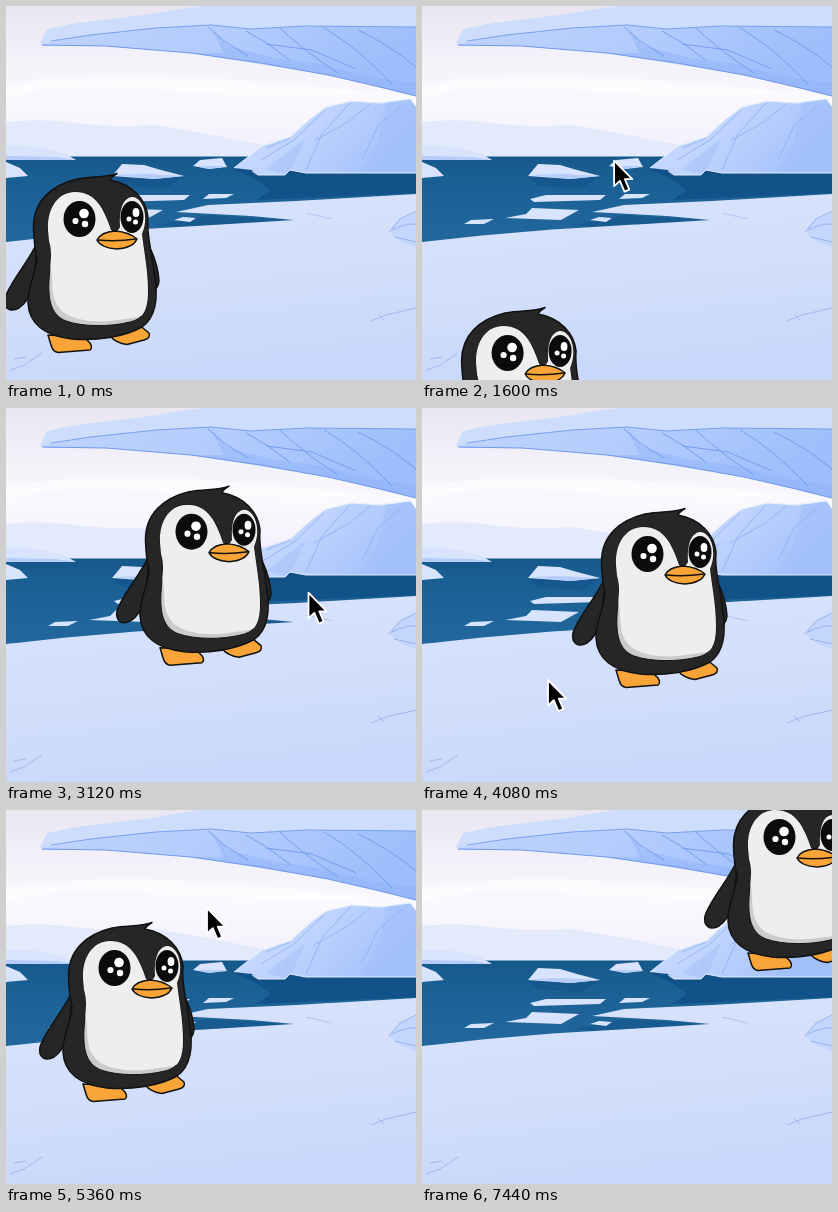
These frames come from a looping animation (410x374 px, 7.52 s). An HTML page:

```html
<!DOCTYPE html>
<html lang="en">
<head>
<meta charset="utf-8">
<title>Penguin on the ice</title>
<style>
html, body { margin: 0; width: 100%; height: 100%; overflow: hidden; background: #d3dffa; }
svg { display: block; width: 100%; height: 100%; }
</style>
</head>
<body>
<svg viewBox="0 0 410 374" preserveAspectRatio="none">
  <defs>
    <linearGradient id="sky" x2="0" y2="1">
      <stop offset="0" stop-color="#e9e6f2"/><stop offset=".35" stop-color="#f3f1f9"/>
      <stop offset=".62" stop-color="#faf9fd"/><stop offset="1" stop-color="#f1effb"/>
    </linearGradient>
    <linearGradient id="sea" x2="0" y2="1">
      <stop offset="0" stop-color="#15588c"/><stop offset=".3" stop-color="#1b6095"/>
      <stop offset="1" stop-color="#22689e"/>
    </linearGradient>
    <linearGradient id="snow" x2=".25" y2="1">
      <stop offset="0" stop-color="#d9e3fb"/><stop offset=".5" stop-color="#d3dffb"/>
      <stop offset="1" stop-color="#c9d9fb"/>
    </linearGradient>
    <linearGradient id="shelf" x2="1" y2=".25">
      <stop offset="0" stop-color="#c0d4fd"/><stop offset=".5" stop-color="#b3ccfd"/>
      <stop offset="1" stop-color="#9dbefb"/>
    </linearGradient>
    <linearGradient id="berg" x2="1" y2=".4">
      <stop offset="0" stop-color="#cfdefe"/><stop offset=".5" stop-color="#bfd4fe"/>
      <stop offset="1" stop-color="#a5c2fb"/>
    </linearGradient>
    <path id="belly" d="M42 224C41 201 53 186 69 186C90 186 98 203 105 224Q110 229 114 221C113 204 117 191 127 191C138 193 143 212 136 228C138 246 142 264 142 285C142 306 136 313 124 316C104 321 77 321 60 315C45 309 42 294 43 274C44 257 47 248 43 235Z"/>
    <clipPath id="inBelly"><use href="#belly"/></clipPath>
  </defs>

  <path fill="url(#sky)" d="M0 0H410V152H0Z"/>
  <path fill="#fff" opacity=".45" d="M0 78Q90 64 200 72T380 88Q250 92 150 84T0 92Z"/>
  <path fill="#e2eafb" d="M0 116Q35 112 70 117T150 119Q200 127 256 139V152H0Z"/>

  <path fill="url(#sea)" d="M0 150.5H410V240H0Z"/>
  <path fill="#0d4c83" opacity=".7" d="M228 163 248 172 265 184 250 194 410 187V166Z"/>
  <path fill="#114f83" opacity=".45" d="M106 171 178 171 160 182 118 180ZM150 219 205 209 285 214 190 223Z"/>

  <g fill="#d8e4fd">
    <path d="M0 139 30 141 58 147 70 154H0Z"/>
    <path d="M0 156 14 162 22 170 0 172Z"/>
    <path d="M106 170 116 158 138 159 155 164 178 170 148 173Z"/>
    <path d="M187 160 194 154 216 152 221 161 203 163Z"/>
    <path d="M108 193 124 189 184 189 178 194 112 196Z"/>
    <path d="M197 193 203 188 228 188 220 192Z"/>
    <path d="M83 212 104 208 110 202 157 204 139 214Z"/>
    <path d="M42 218 49 214 72 213 62 218Z"/>
    <path d="M168 214 177 211 190 212 184 216Z"/>
  </g>
  <path fill="#b5cdf8" d="M0 150 50 151 70 154H0ZM108 169 140 168 178 170 148 173ZM190 160 221 160 203 163Z"/>

  <path fill="url(#berg)" d="M228 162 256 140 284 131 304 113 320 101 346 95 374 97 404 93 410 101V167L300 167 284 164 279 169 252 169 246 164Z"/>
  <path fill="#9dbcf9" opacity=".45" d="M380 97 404 93 410 101V167H352L372 136ZM260 163 300 132 286 162 279 168Z"/>
  <path fill="none" stroke="#8fb2f2" stroke-width=".9" d="M344 97 316 128 300 164M364 98 342 116 308 135M396 99 372 120 356 153M318 105 288 134 255 154M284 132 260 142"/>
  <path fill="none" stroke="#e6eefe" stroke-width="1" d="M228 162 256 140 284 131 304 113 320 101 346 95 374 97 404 93M246 165 252 169H279L284 164 300 167H410"/>

  <path fill="#cfddfc" d="M34 37 41 23 70 17 145 8 180 2 196 0H410V34L40 39Z"/>
  <path fill="url(#shelf)" d="M34 38 85 29 150 22 205 19 245 23 300 20 410 21V90L374 81 322 69 255 57 185 47 100 40 40 40Z"/>
  <path fill="#8fb3fa" opacity=".5" d="M205 22 222 40 268 52 315 58 370 72 410 77V90L322 69 185 47 218 47Z"/>
  <g fill="none" stroke="#6f9aeb" stroke-width="1.1">
    <path d="M36 39 100 40 185 47 255 57 322 69 374 81 410 90"/>
    <path d="M45 35 85 29 150 22 205 19 245 23 300 20 410 21" stroke-width=".9"/>
    <path d="M202 21 218 35 242 50M240 25 262 38 285 55M274 22Q294 42 332 67M318 22Q350 40 386 78M352 24Q382 38 410 61M260 38 306 44 350 63" stroke-width=".9"/>
  </g>

  <path fill="url(#snow)" d="M0 236 60 229.5 130 223.5 215 218.5 288 214 245 210 170 206 202 199 290 195 410 188V374H0Z"/>
  <path fill="#c3d6fc" d="M383 226 394 213 410 205V241L396 236Z"/>
  <g fill="none" stroke="#94b2ea" stroke-width="1">
    <path d="M383 226 394 213 410 205M386 224Q400 217 410 218M388 231 410 236"/>
    <path d="M4 364 18 359 36 347M8 353 20 351M365 315 380 309 410 302M372 308 378 314" stroke-width=".8"/>
    <path d="M300 207 326 213" stroke-width=".6"/>
  </g>

  <g id="penguin" stroke="#111" stroke-width="1.5" stroke-linejoin="round">
    <path fill="#f9a437" d="M42 329 78 331 84 337Q87 342 84 344L52 346.5Q47 346 45 339Z"/>
    <path fill="#f9a437" d="M104 330 132 318 143 327Q145 332 138 334L121 338.5Q110 337 104 330Z"/>
    <path fill="#262626" d="M32 235C22 257 4 276-1 292C-3 302 4 307 13 302Q22 296 27 280Z"/>
    <path fill="#262626" d="M145 244Q152 259 153 275Q152 284 146 284Z"/>
    <path fill="#262626" d="M27.5 222C27 195 46 179 71 173C88 170 98 172 111 167.5Q105 171 104 174C126 178 140 193 142 211C140 230 146 245 148 265C153 292 149 312 136 321C118 331 91 335 66 333C39 330 23 318 22 297C21 282 30 268 31 252Q28 239 27.5 222Z"/>
    <use href="#belly" fill="#cbcbcb" stroke-width="1"/>
    <g clip-path="url(#inBelly)" stroke="none">
      <path fill="#eee" d="M38 180H146V303Q138 312 118 313C96 317 76 316 62 309C49 302 46 291 46 270L38 225Z"/>
    </g>
    <g stroke="none">
      <ellipse cx="73.5" cy="213" rx="16" ry="18" fill="#0b0b0b"/>
      <ellipse cx="126" cy="211" rx="11.5" ry="16" fill="#0b0b0b"/>
      <g fill="#fff">
        <circle cx="78" cy="207.5" r="4.8"/><circle cx="69.5" cy="215" r="3.1"/><circle cx="79" cy="218" r="3.2"/>
        <ellipse cx="130" cy="206.5" rx="3.4" ry="4.5"/><circle cx="123" cy="213" r="2.5"/><circle cx="129.5" cy="216" r="2.5"/>
      </g>
    </g>
    <path fill="#f9a437" d="M91 234Q95 226 109 225Q123 226 131 233Q127 242 111 243Q95 242 91 234Z"/>
    <path fill="none" d="M92 234Q110 236 130 233"/>
  </g>

  <g id="cursor">
    <path fill="#000" stroke="#fff" stroke-width="1.8" stroke-linejoin="round" d="M0 0V25.5L5.8 20.2 10.4 31 15.2 29 10.8 18.6H18.2Z"/>
  </g>
</svg>
<script>
const LOOP = 7520, STEP = 80;

// Each key is [time, x, y].
const penguinPath = [
  [0, 0, 0], [400, -20, 225], [1200, -20, 240], [1700, 20, 100],
  [2160, 44, -75], [4080, 152, -67], [5360, 35, -55],
  [6480, 84, -120], [7440, 284, -186]
];
const cursorPath = [
  [0, 120, 440], [480, 138, 385], [720, 149, 222], [2160, 223, 145],
  [3200, 300, 190], [4080, 126, 272], [4640, 95, 220], [5360, 201, 98],
  [6480, 228, 196], [7120, 425, 80], [7440, 460, 20]
];

function slope(path, i, axis) {
  const a = path[Math.max(i - 1, 0)], b = path[Math.min(i + 1, path.length - 1)];
  return (b[axis] - a[axis]) / (b[0] - a[0]);
}

// Smooth curve through the keys, with uneven time spacing.
function along(path, time) {
  const last = path.length - 1;
  if (time >= path[last][0]) return path[last].slice(1);
  const i = path.findIndex((key, n) => n < last && time < path[n + 1][0]);
  const a = path[i], b = path[i + 1], span = b[0] - a[0];
  const u = (time - a[0]) / span, v = 1 - u;
  return [1, 2].map(axis =>
    v * v * (1 + 2 * u) * a[axis] + u * u * (3 - 2 * u) * b[axis] +
    span * u * v * (v * slope(path, i, axis) - u * slope(path, i + 1, axis)));
}

const penguin = document.getElementById('penguin');
const cursor = document.getElementById('cursor');

function place(node, path, time) {
  const [x, y] = along(path, time);
  node.setAttribute('transform', `translate(${x.toFixed(1)} ${y.toFixed(1)})`);
}

function draw(elapsed) {
  const time = Math.floor((elapsed % LOOP) / STEP) * STEP;
  place(penguin, penguinPath, time);
  place(cursor, cursorPath, time);
}

const start = performance.now();
function tick() {
  draw(performance.now() - start);
  requestAnimationFrame(tick);
}
tick();
</script>
</body>
</html>
```
